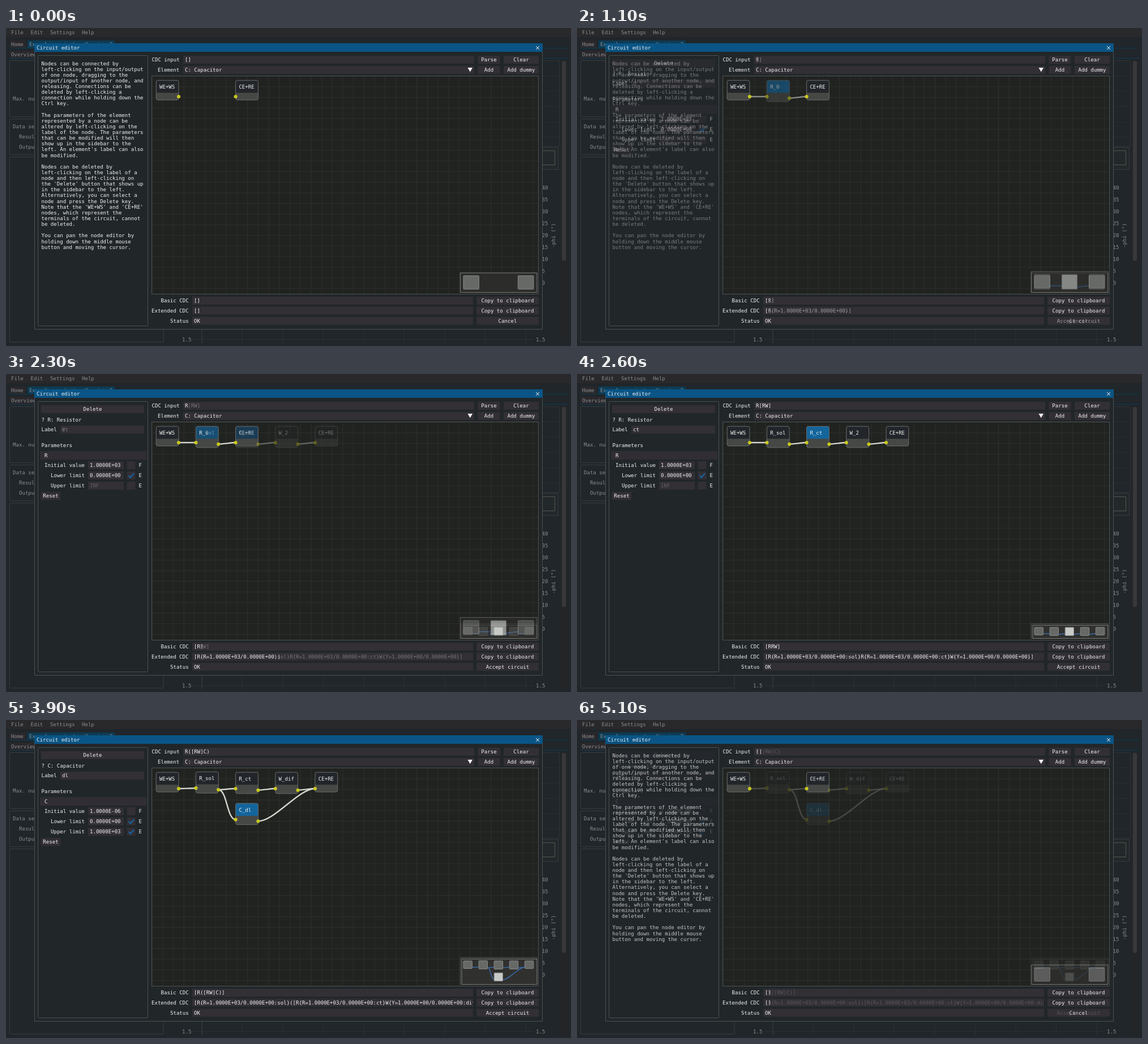
Recreate the animation shown at these times as an HTML page with a canvas. Size 998 px wide and 561 px high, loop 5200 ms.

```html
<!DOCTYPE html>
<html>
<head>
<meta charset="utf-8">
<title>Circuit editor</title>
<style>
html, body { margin: 0; width: 100%; height: 100%; overflow: hidden; background: #20262a; }
canvas { display: block; }
</style>
</head>
<body>
<canvas id="stage" width="998" height="561"></canvas>
<script>
const W = 998, H = 561, LOOP = 5200;
const FADES = [1000, 2300, 3600, 4900];
const CHAR = 5.46;
const FONT = '9.07px "DejaVu Sans Mono", monospace';
const WHITE = '#f2f2f2', DIM = '#8b8e90', FIELD = '#322f35', EDGE = '#4c5054';

const HELP = `Nodes can be connected by
left-clicking on the input/output
of one node, dragging to the
output/input of another node, and
releasing. Connections can be
deleted by left-clicking a
connection while holding down the
Ctrl key.

The parameters of the element
represented by a node can be
altered by left-clicking on the
label of the node. The parameters
that can be modified will then
show up in the sidebar to the
left. An element's label can also
be modified.

Nodes can be deleted by
left-clicking on the label of a
node and then left-clicking on
the 'Delete' button that shows up
in the sidebar to the left.
Alternatively, you can select a
node and press the Delete key.
Note that the 'WE+WS' and 'CE+RE'
nodes, which represent the
terminals of the circuit, cannot
be deleted.

You can pan the node editor by
holding down the middle mouse
button and moving the cursor.`;

const first = { label: 'WE+WS', col: 0, end: true };
const last = col => ({ label: 'CE+RE', col, end: true });
const R_SOL = 'R{R=1.0000E+03/0.0000E+00:sol}';
const R_CT = 'R{R=1.0000E+03/0.0000E+00:ct}';
const W_VAL = 'W{Y=1.0000E+00/0.0000E+00';

// map: minimap scale, box top and top of the first node row
const states = [
  {
    input: '[]', basic: '[]', extended: '[]', action: 'Cancel',
    nodes: [first, last(2)], links: [], map: [.687, 432, 437]
  },
  {
    input: 'R', basic: '[R]', extended: '[R{R=1.0000E+03/0.0000E+00}]', action: 'Accept circuit',
    nodes: [first, { label: 'R_0', col: 1, active: true }, last(2)],
    links: [[0, 1], [1, 2]], map: [.687, 429.5, 435],
    side: { sym: 'R', name: 'Resistor', hint: '0', value: '1.0000E+03' }
  },
  {
    input: 'R[RW]', basic: '[RRW]', extended: `[${R_SOL}${R_CT}${W_VAL}}]`, action: 'Accept circuit',
    nodes: [first, { label: 'R_sol', col: 1 }, { label: 'R_ct', col: 2, active: true },
      { label: 'W_2', col: 3 }, last(4)],
    links: [[0, 1], [1, 2], [2, 3], [3, 4]], map: [.386, 440.5, 447], view: true,
    side: { sym: 'R', name: 'Resistor', label: 'ct', value: '1.0000E+03' }
  },
  {
    input: 'R([RW]C)', basic: '[R([RW]C)]', action: 'Accept circuit',
    extended: `[${R_SOL}([${R_CT}${W_VAL}:dif}]C{C=1.0000E-06/0.0000E+00/1.0000E+03:dl})]`,
    nodes: [first, { label: 'R_sol', col: 1, dy: -.8 }, { label: 'R_ct', col: 2 },
      { label: 'W_dif', col: 3 }, last(4), { label: 'C_dl', col: 2, dy: 54.7, active: true }],
    links: [[0, 1], [1, 2], [2, 3], [3, 4], [1, 5], [5, 4]], map: [.386, 419, 425], view: true,
    side: { sym: 'C', name: 'Capacitor', label: 'dl', value: '1.0000E-06', upper: '1.0000E+03' }
  }
];

let c;

function rect(x, y, x2, y2, fill, stroke, r = 0) {
  c.beginPath();
  c.roundRect(x, y, x2 - x, y2 - y, r);
  if (fill) { c.fillStyle = fill; c.fill(); }
  if (stroke) { c.strokeStyle = stroke; c.lineWidth = 1; c.stroke(); }
}

function text(s, x, y, color = WHITE) {
  c.fillStyle = color;
  c.fillText(s, x, y + 3);
}

function path(points, color, width = 1) {
  c.beginPath();
  points.forEach(p => c.lineTo(...p));
  c.strokeStyle = color;
  c.lineWidth = width;
  c.stroke();
}

function button(s, x, x2, y) {
  rect(x, y - 7, x2, y + 7, FIELD, null, 1);
  text(s, (x + x2 - s.length * CHAR) / 2, y);
}

function field(s, x, x2, y, color) {
  c.save();
  rect(x, y - 7, x2, y + 7, FIELD);
  c.clip();
  text(s, x + 3, y, color);
  c.restore();
}

function backdrop() {
  rect(0, 0, W, H, '#20262a');
  rect(0, 0, W, 16, '#29282b');
  [['File', 9], ['Edit', 43.5], ['Settings', 78], ['Help', 134]].forEach(([s, x]) => text(s, x, 8, DIM));
  rect(6, 22, 35, 35, '#2a282c');
  text('Home', 9, 29, DIM);
  rect(38, 22, 192, 35, '#0d3b54');
  text('Example project - Version 2', 41, 29, DIM);
  rect(6, 35, 992, 36, '#0d3b54');
  rect(6, 40, 56, 53, '#2a282c');
  text('Overview', 9, 47, DIM);
  rect(6, 53, 992, 54, '#0d3b54');
  [[57.5, 156.5], [160.5, 223.5], [227.5, 554]].forEach(([a, b]) => rect(6.5, a, 278, b, null, '#373c3f', 1));
  text('Max. num.', 12, 125, DIM);
  text('Data set', 12, 174, DIM);
  text('Result', 23, 192, DIM);
  text('Output', 23, 210, DIM);

  rect(900, 57.5, 977.5, 208.5, null, '#2d3234');
  for (let y = 84; y < 208; y += 27) path([[900, y + .5], [977, y + .5]], '#282d30');
  rect(900, 210.5, 975.5, 249.5, '#23282a', '#373c3e');
  rect(900, 216.5, 969.5, 241.5, null, '#55574f');
  rect(979, 57, 991, 555, '#242527');
  rect(982, 58, 989, 411, '#38383b', null, 3);
  for (let i = 0; i < 9; i++) text(String(40 - 5 * i), 946.5, 281.5 + 21 * i, DIM);
  c.save();
  c.translate(967, 366);
  c.rotate(-Math.PI / 2);
  text('-phi (°)', -4 * CHAR, 0, DIM);
  c.restore();

  for (let i = 0; i < 9; i++) path([[346 + 71.5 * i, 525], [346 + 71.5 * i, 556]], i ? '#2b3033' : '#3b4042');
  path([[331, 549.5], [932, 549.5]], '#2b3033');
  text('1.5', 311, 549.5, DIM);
  text('1.5', 936, 549.5, DIM);
}

function dialog(s) {
  rect(50.5, 27.5, 947.5, 531.5, '#212629', EDGE);
  rect(50, 27, 948, 42, '#0a5586');
  text('Circuit editor', 54, 35);
  path([[936, 32], [942, 38]], WHITE);
  path([[942, 32], [936, 38]], WHITE);
  rect(56.5, 48.5, 250.5, 525.5, null, EDGE, 1);

  text('CDC input', 257.5, 56);
  field(s.input, 313, 827, 56);
  text('Element', 268, 74);
  field('C: Capacitor', 313, 827, 74);
  c.beginPath();
  c.moveTo(815.5, 70);
  c.lineTo(824, 70);
  c.lineTo(819.8, 77.5);
  c.fillStyle = WHITE;
  c.fill();
  button('Parse', 833.5, 872.5, 56);
  button('Clear', 879, 941, 56);
  button('Add', 833.5, 872.5, 74);
  button('Add dummy', 879, 941, 74);

  text('Basic CDC', 273.5, 481);
  field(s.basic, 329, 825, 481);
  text('Extended CDC', 257, 498.5);
  field(s.extended, 329, 825, 498.5);
  text('Status', 290, 516.5);
  field('OK', 329, 825, 516.5);
  button('Copy to clipboard', 831, 941, 481);
  button('Copy to clipboard', 831, 941, 498.5);
  button(s.action, 831, 941, 516.5);
}

function sidebar(p) {
  if (!p) {
    HELP.split('\n').forEach((line, i) => text(line, 62.5, 62.5 + 10.13 * i));
    return;
  }
  button('Delete', 62, 244, 62);
  text(`? ${p.sym}: ${p.name}`, 62.5, 80.5);
  text('Label', 62.5, 98);
  field(p.label || p.hint, 96, 244, 98, p.label ? WHITE : '#8a8a8c');
  text('Parameters', 62.5, 125.5);
  rect(60, 136, 248, 151, '#302e34');
  text(p.sym, 68, 143.5);
  [['Initial value', 68, p.value, false, 'F'],
   ['Lower limit', 79, '0.0000E+00', true, 'E'],
   ['Upper limit', 79, p.upper, !!p.upper, 'E']].forEach(([name, x, value, on, key], i) => {
    const y = 161 + 18 * i;
    text(name, x, y);
    field(value || 'INF', 145, 208, y, value ? WHITE : '#646266');
    rect(213.5, y - 7, 228.5, y + 7, FIELD);
    if (on) path([[216.5, y], [219.8, y + 3.5], [226, y - 3.5]], '#1565a5', 2);
    text(key, 234.5, y);
  });
  button('Reset', 62, 96, 215);
}

const nodeX = n => 265.2 + 70.2 * n.col;
const nodeY = n => 92.3 + (n.dy || 0);
const nodeH = n => n.end ? 34.7 : 37.5;
const inPin = n => [nodeX(n), nodeY(n) + 28.7];
const outPin = n => [nodeX(n) + 39.8, nodeY(n) + (n.end ? 28.7 : 31.5)];

function drawLinks(s, color, width) {
  c.strokeStyle = color;
  c.lineWidth = width;
  s.links.forEach(([a, b]) => {
    const [x, y] = outPin(s.nodes[a]), [x2, y2] = inPin(s.nodes[b]);
    const bend = Math.hypot(x2 - x, y2 - y) / 4;
    c.beginPath();
    c.moveTo(x, y);
    c.bezierCurveTo(x + bend, y, x2 - bend, y2, x2, y2);
    c.stroke();
  });
}

function drawPin([x, y]) {
  c.beginPath();
  c.arc(x, y, 3.1, 0, 7);
  c.fillStyle = '#c8c81e';
  c.fill();
}

function drawNode(n) {
  const x = nodeX(n), y = nodeY(n), x2 = x + 39.8, y2 = y + nodeH(n);
  rect(x, y, x2, y2, '#464846', null, 3);
  rect(x, y, x2, y + 22, n.active ? '#13659c' : '#22262a', null, [3, 3, 0, 0]);
  rect(x, y, x2, y2, null, '#696c6b', 3);
  text(n.label, x + 5.8, y + 11.5);
  if (n.label !== 'WE+WS') drawPin(inPin(n));
  if (n.label !== 'CE+RE') drawPin(outPin(n));
}

function minimap(s) {
  const [k, boxTop, rowTop] = s.map;
  rect(802.5, boxTop, 938, 466.5, '#2c2d2b', s.view ? '#515350' : '#7e807e');
  if (s.view) rect(805, boxTop + 2.8, 938, 466.5, '#30302f', '#7e807e');
  c.save();
  c.translate(808 - 265.2 * k, rowTop - 92.3 * k);
  c.scale(k, k);
  drawLinks(s, '#3b69a2', 1.5 / k);
  c.restore();
  s.nodes.forEach(n => {
    const x = 808 + 70.2 * n.col * k, y = rowTop + (n.dy || 0) * k;
    rect(x, y, x + 39.8 * k, y + nodeH(n) * k, n.active ? '#c8cac8' : '#676967', '#898b89', 1);
  });
}

function editor(s) {
  rect(257.5, 84.5, 940.5, 469.5, '#212320');
  for (let x = 258; x < 940; x += 18.713) path([[x, 85], [x, 469]], '#2e302c');
  for (let y = 85; y < 469; y += 18.713) path([[258, y], [940, y]], '#2e302c');
  rect(257.5, 84.5, 940.5, 469.5, null, EDGE);
  drawLinks(s, '#d6d7d0', 2.4);
  s.nodes.forEach(drawNode);
  minimap(s);
}

const pictures = states.map(s => {
  const canvas = document.createElement('canvas');
  canvas.width = W;
  canvas.height = H;
  c = canvas.getContext('2d');
  c.font = FONT;
  backdrop();
  dialog(s);
  sidebar(s.side);
  editor(s);
  return canvas;
});

const ctx = document.getElementById('stage').getContext('2d');

function draw() {
  const t = performance.now() % LOOP;
  const i = FADES.filter(f => f <= t).length;
  ctx.globalAlpha = 1;
  ctx.drawImage(pictures[Math.max(0, i - 1)], 0, 0);
  if (i) {
    // stepped cross-fade, one step each 100 ms
    const step = Math.floor((t - FADES[i - 1]) / 100);
    ctx.globalAlpha = Math.min(1, .36 + .2134 * step);
    ctx.drawImage(pictures[i % 4], 0, 0);
  }
  requestAnimationFrame(draw);
}
draw();
</script>
</body>
</html>
```
